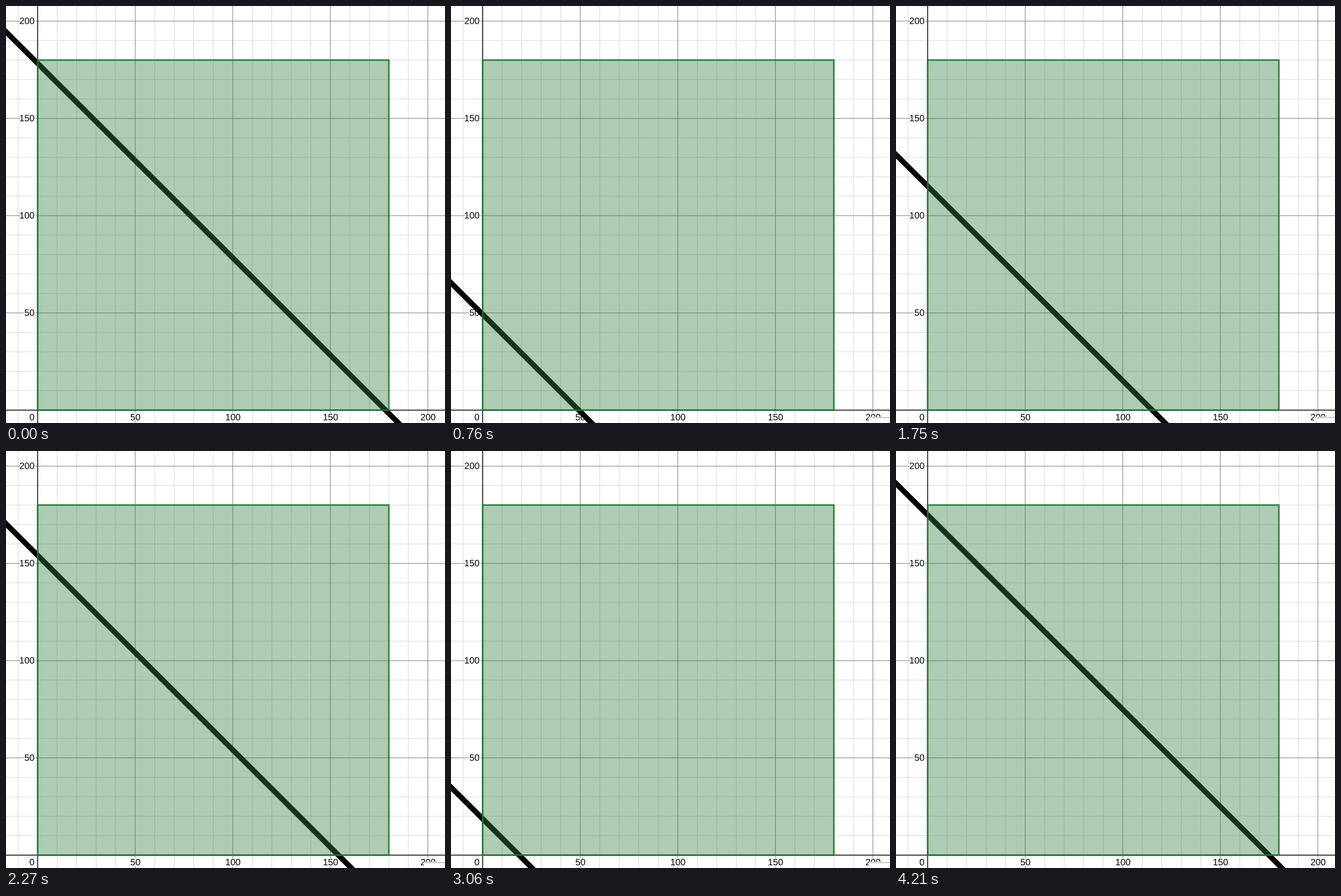
Recreate the animation shown at these times as a matplotlib script. Size 767 by 730 pixels, loop 4240 ms.

```python
import numpy as np
import matplotlib.pyplot as plt
from matplotlib.animation import FuncAnimation
from matplotlib.collections import LineCollection
from matplotlib.patches import Rectangle
from matplotlib.patheffects import withStroke

W, H, DPI = 767, 730, 100
PX = 72 / DPI                      # one pixel in points
LOOP, TICK = 4240, 20
X0, Y0 = 55.3, 707.5               # graph origin in pixels
SX, SY = 3.409, 3.405              # pixels per unit
FILL = (52 / 255, 128 / 255, 66 / 255)

# The intercept bounces between 0 and 180 twice per loop.
KEY_T = [0, 1050, 1074, 2125, 3169, 3178, 4210, LOOP]
KEY_C = [178.3, 0, 0, 179, 0, 0, 174.9, 180]

# Steps last 30 ms, apart from these.
HOLDS = {0: 70, 1390: 40, 4050: 40}
HOLDS.update(dict.fromkeys(
    [760, 900, 1040, 1700, 1870, 2010, 2270, 2560, 3060, 3170, 3250], 50))


def step_starts():
    starts, t = [], 0
    while t < LOOP:
        starts.append(t)
        t += HOLDS.get(t, 30)
    return np.array(starts)


def gx(x):
    return X0 + SX * x


def gy(y):
    return Y0 - SY * y


STEPS = step_starts()

fig = plt.figure(figsize=(W / DPI, H / DPI), dpi=DPI, facecolor="white")
ax = fig.add_axes([0, 0, 1, 1])
ax.set_xlim(0, W)
ax.set_ylim(H, 0)
ax.axis("off")


def grid(values, color, width, z):
    segs = [[(gx(v), 0), (gx(v), H)] for v in values]
    segs += [[(0, gy(v)), (W, gy(v))] for v in values]
    ax.add_collection(LineCollection(segs, colors=color, zorder=z,
                                     linewidths=width * PX, snap=False))


def label(x, y, value, ha="center"):
    ax.text(x, y + 5, str(value), ha=ha, va="baseline", zorder=4,
            family="Liberation Sans", size=16 * PX, color="black",
            path_effects=[withStroke(linewidth=4 * PX, foreground="white")])


grid([v for v in range(-10, 220, 10) if v % 50], "#dcdcdc", 1.1, 1)
grid([50, 100, 150, 200], "#909090", 1.2, 2)
for xs, ys in (([X0, X0], [0, H]), ([0, W], [Y0, Y0])):
    ax.plot(xs, ys, color="#1a2220", lw=1.7 * PX, zorder=3, snap=False)

label(45.3, 720.2, 0)
for v in (50, 100, 150, 200):
    label(gx(v) + 0.3, 720.2, v)
    label(49.8, gy(v), v, "right")

line, = ax.plot([], [], color="black", lw=9.4 * PX, zorder=5)

box = (gx(0), gy(180)), 180 * SX, 180 * SY
ax.add_patch(Rectangle(*box, fc=FILL, ec="none", alpha=0.4, zorder=6))
ax.add_patch(Rectangle(*box, fc="none", ec=(0.13, 0.47, 0.21, 0.9),
                       lw=2.8 * PX, zorder=7, snap=False))

# White panel peeking in at the lower right corner
panel = [
    ax.add_patch(Rectangle((730, 719), 40, 14, fc="white", ec="none", zorder=8)),
    ax.plot([730, W], [719.5, 719.5], color="#a3b3a5", lw=1.3 * PX, zorder=9)[0],
]


def update(i):
    t = i * TICK + TICK / 2
    t = STEPS[np.searchsorted(STEPS, t, side="right") - 1]
    c = np.interp(t, KEY_T, KEY_C)
    x = np.array([-30, c + 20])
    line.set_data(gx(x), gy(c - x))
    for part in panel:
        part.set_visible(70 <= t < 4210)
    return [line, *panel]


anim = FuncAnimation(fig, update, frames=LOOP // TICK, interval=TICK,
                     repeat=True, repeat_delay=0, blit=False)
plt.show()
```
